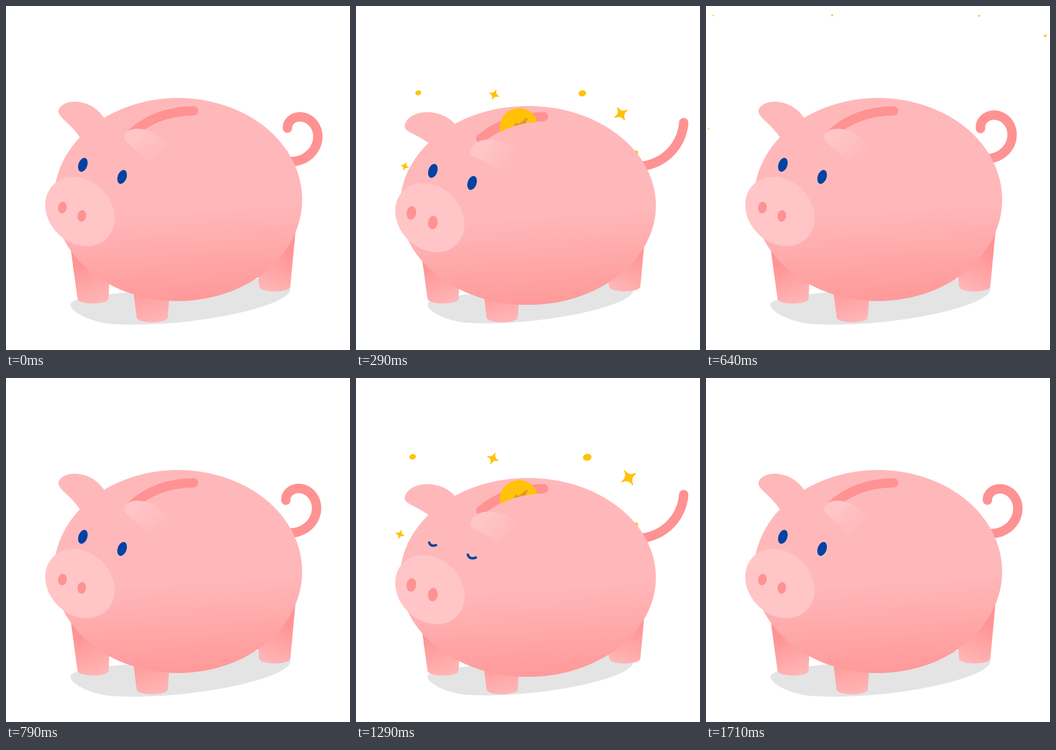
Animation, 640 px wide and 640 px high, one loop 1.93 s. Source, as an HTML page with a canvas:

```html
<!DOCTYPE html>
<html lang="en">
<head>
<meta charset="utf-8">
<title>Piggy bank</title>
<style>
html, body { margin: 0; width: 100%; height: 100%; overflow: hidden; background: #fff; }
canvas { display: block; width: 100vw; height: 100vh; }
</style>
</head>
<body>
<canvas id="stage"></canvas>
<script>
const SIZE = 640, LOOP = 1930, STEP = 1000 / 14, HALF = 1000;
const PINK = '#ffb8ba', DEEP = '#ff9292', PALE = '#ffc5c7', GOLD = '#ffc208', BLUE = '#0043a4', BRONZE = '#e09a32';
const RAD = Math.PI / 180;

const canvas = document.getElementById('stage');
const ctx = canvas.getContext('2d');

const clamp = k => Math.min(1, Math.max(0, k));
const ease = k => k * k * (3 - 2 * k);
const mix = (a, b, k) => a + (b - a) * k;

// Eased blend between [time, pose] keys; poses are plain objects of numbers.
function poseAt(keys, t) {
  const i = Math.max(1, keys.findIndex(key => t < key[0]));
  if (t >= keys[keys.length - 1][0]) return keys[keys.length - 1][1];
  const [t0, a] = keys[i - 1], [t1, b] = keys[i];
  const k = ease(clamp((t - t0) / (t1 - t0)));
  return Object.fromEntries(Object.keys(a).map(n => [n, mix(a[n], b[n], k)]));
}

function fill(color) {
  ctx.fillStyle = color;
  ctx.fill();
}

function stroke(color, width) {
  ctx.strokeStyle = color;
  ctx.lineWidth = width;
  ctx.lineCap = ctx.lineJoin = 'round';
  ctx.stroke();
}

function oval(x, y, rx, ry, turn, color) {
  ctx.beginPath();
  ctx.ellipse(x, y, rx, ry, turn, 0, Math.PI * 2);
  fill(color);
}

function ramp(x0, y0, x1, y1, from, to) {
  const g = ctx.createLinearGradient(x0, y0, x1, y1);
  g.addColorStop(0, from);
  g.addColorStop(1, to);
  return g;
}

// The tail is a spiral: it leaves the base at heading h and its radius shrinks as it turns.
const curled = { x: 530, y: 289.5, h: 0, turn: 275, r: 55, shrink: 8.5 };
const straight = { x: 530, y: 298, h: -5, turn: 81, r: 87.5, shrink: 0 };
const loose = { x: 530, y: 286.5, h: 25, turn: 283, r: 50.5, shrink: 7 };
const tight = { x: 522, y: 284, h: 0, turn: 278, r: 51.5, shrink: 7 };
const flick = [[170, curled], [280, straight], [310, straight], [425, loose]];
const tailKeys = [
  [...flick, [640, tight], [850, curled]],
  [...flick, [565, curled]]
];

function drawTail(pose) {
  const steps = 60, d = pose.turn * RAD / steps;
  let { x, y } = pose;
  ctx.beginPath();
  ctx.moveTo(x, y);
  for (let i = 0; i < steps; i++) {
    const a = (i + 0.5) * d;
    const len = (pose.r - pose.shrink * a) * d;
    x += len * Math.cos(pose.h * RAD - a);
    y += len * Math.sin(pose.h * RAD - a);
    ctx.lineTo(x, y);
  }
  stroke(DEEP, 17.5);
}

// Position at 290 ms, speed in px/ms, radius; stars also have a turn.
const sparks = [
  { x: 115.5, y: 161, vx: -0.286, vy: -0.403, r: 6.2 },
  { x: 421.5, y: 162, vx: 0.244, vy: -0.404, r: 8 },
  { x: 257, y: 164.5, vx: -0.063, vy: -0.414, r: 10.5, turn: 0.38 },
  { x: 493.5, y: 200, vx: 0.387, vy: -0.406, r: 14.5, turn: -0.53 },
  { x: 90.5, y: 298, vx: -0.241, vy: -0.196, r: 8.2, turn: 0.33 }
];

function star(x, y, r, turn) {
  const at = (radius, a) => [x + radius * Math.cos(turn + a), y + radius * Math.sin(turn + a)];
  ctx.beginPath();
  ctx.moveTo(...at(r, 0));
  for (let a = 90; a <= 360; a += 90) {
    ctx.quadraticCurveTo(...at(r * 0.12, (a - 45) * RAD), ...at(r, a * RAD));
  }
  ctx.closePath();
  fill(GOLD);
  stroke(GOLD, r * 0.16);
}

function drawSparks(s) {
  if (s < 180 || s > 705) return;
  const scale = s < 325 ? 1 - (325 - s) * 0.003 : 1 - ((s - 325) / 385) ** 1.5;
  for (const p of sparks) {
    const x = p.x + p.vx * (s - 290), y = p.y + p.vy * (s - 290), r = p.r * scale;
    if (p.turn === undefined) oval(x, y, r, r * 0.8, -0.25, GOLD);
    else star(x, y, r, p.turn);
  }
}

function drawShadow(q) {
  ctx.save();
  ctx.translate(325, 553);
  ctx.scale(1 - 0.064 * q, 1 - 0.06 * q);
  ctx.translate(-325, -553);
  ctx.beginPath();
  ctx.moveTo(120, 556);
  ctx.bezierCurveTo(120, 535, 250, 535, 465, 508);
  ctx.bezierCurveTo(500, 504, 529, 514, 529, 527);
  ctx.bezierCurveTo(529, 560, 330, 602, 190, 591);
  ctx.bezierCurveTo(145, 584, 120, 566, 120, 556);
  fill('#e4e4e4');
  ctx.restore();
}

// x and foot place the lower left corner; the sides flare out towards the top.
function leg(x, foot, flareL, flareR, light) {
  const w = 58, h = 110, mid = x + w / 2;
  ctx.beginPath();
  ctx.moveTo(x - flareL, foot - h);
  ctx.lineTo(x, foot);
  ctx.bezierCurveTo(x + 2, foot + 12, x + w - 2, foot + 12, x + w, foot);
  ctx.lineTo(x + w + flareR, foot - h);
  fill(ramp(mid - light, foot - 68, mid + light, foot + 10, '#ff9494', '#ffb7b8'));
}

// A leaf from root round the tip to the end; q lets it droop.
function ear(rootX, rootY, tipX, tipY, endX, endY, q, color) {
  const rx = rootX + q, ry = rootY + 13 * q;
  const tx = tipX - 7 * q, ty = tipY + 28 * q;
  const ex = endX + q, ey = endY + 10 * q;
  ctx.beginPath();
  ctx.moveTo(rx, ry);
  ctx.bezierCurveTo(rx - 17 - 11 * q, ry - 27 + 6 * q, tx - 4, ty + 13, tx, ty);
  ctx.bezierCurveTo(tx + 8, ty - 21 - 9 * q, ex - 26, ey - 43 + 9 * q, ex, ey);
  fill(color);
}

function drawBody(q) {
  const cy = 360 + 11 * q;
  oval(320, cy, 231 + 7 * q, 189 - 4 * q, 0, ramp(316, cy + 17, 327, cy + 188, PINK, '#ff9999'));
}

function slotCurve(q, dx, dy) {
  const y = 195 + 11 * q + dy;
  ctx.moveTo(232 + dx, y + 44 - 3 * q);
  ctx.bezierCurveTo(265 + dx, y + 13, 305 + dx, y + 0.5, 349 + dx, y);
}

function drawCoin(u, q) {
  if (u < 60 || u > 380) return;
  const k = clamp((u - 75) / 205);
  const y = u < 310 ? mix(38, 226, k * (0.6 + 0.4 * k)) : mix(226, 300, (u - 310) / 45);
  ctx.save();
  // Only the part above the slot's front edge shows.
  ctx.beginPath();
  slotCurve(q, 4, 8.7);
  ctx.lineTo(SIZE, 200);
  ctx.lineTo(SIZE, 0);
  ctx.lineTo(0, 0);
  ctx.lineTo(0, 270);
  ctx.clip();
  ctx.translate(303.3, y);
  oval(0, 0, 36, 36, 0, GOLD);
  ctx.beginPath();
  ctx.moveTo(14.5, -16.5);
  ctx.lineTo(2.5, 8);
  ctx.lineTo(-3, 4.5);
  ctx.lineTo(-17, 14.5);
  ctx.lineTo(-5.5, -7.5);
  ctx.lineTo(-0.5, -5);
  ctx.closePath();
  fill(BRONZE);
  stroke(BRONZE, 3);
  ctx.restore();
}

function eye(x, y, size, asleep) {
  if (!asleep) return oval(x, y, 8.3, 13.4, 0.33, BLUE);
  ctx.beginPath();
  ctx.moveTo(x - 8 * size, y - 0.5);
  ctx.quadraticCurveTo(x - 5 * size, y + 9 * size, x + 7 * size, y + 5 * size);
  stroke(BLUE, 4.5);
}

function drawFace(q, asleep) {
  const dy = 11.2 * q, rx = 8 + q, ry = 10.8 + 1.8 * q;
  eye(143, 295.5 + dy, 0.85, asleep);
  eye(216, 318 + dy, 1, asleep);
  oval(137.5, 382.5 + dy, 70.5, 57.9, Math.PI / 4, PALE);
  oval(105 - 2 * q, 375 + 10 * q, rx, ry, 0.12, DEEP);
  oval(141 + 2 * q, 390.5 + 12.5 * q, rx, ry, 0.12, DEEP);
}

function fitStage() {
  const dpr = devicePixelRatio || 1;
  const w = Math.round(innerWidth * dpr), h = Math.round(innerHeight * dpr);
  if (canvas.width !== w || canvas.height !== h) {
    canvas.width = w;
    canvas.height = h;
  }
  ctx.setTransform(w / SIZE, 0, 0, h / SIZE, 0, 0);
  ctx.clearRect(0, 0, SIZE, SIZE);
}

function draw(t) {
  const round = t < HALF ? 0 : 1;
  const u = t - round * HALF;
  const q = ease(clamp((u - 170) / 110)) - ease(clamp((u - 310) / 115));

  fitStage();
  drawShadow(q);
  drawSparks(round ? t - 960 : t + 3);
  drawTail(poseAt(tailKeys[round], u));
  if (t < 20 || (u > 250 && u < 330)) oval(521, 272.5, 3.8, 3.8, 0, GOLD);
  leg(133, 544.5, 15, 4, 16);
  leg(243, 579.5, 13.5, 8, 12);
  leg(471, 522, 11.5, 10.3, -18);
  ear(137, 244, 98, 193, 185, 212, q, PINK);
  drawBody(q);

  ctx.beginPath();
  slotCurve(q, 0, 0);
  stroke(DEEP, 17.5);
  drawCoin(u, q);
  ear(262, 291, 220, 241, 305, 266, q,
    ramp(244, 242 + 16 * q, 282 + 6 * q, 284 + 6 * q, PALE, PINK));
  drawFace(q, t > 1180 && t < 1540);
}

const start = performance.now();
function tick() {
  const t = (performance.now() - start) % LOOP;
  draw(Math.min(24, Math.floor((t + 5) / STEP)) * STEP);
  requestAnimationFrame(tick);
}
tick();
</script>
</body>
</html>
```
